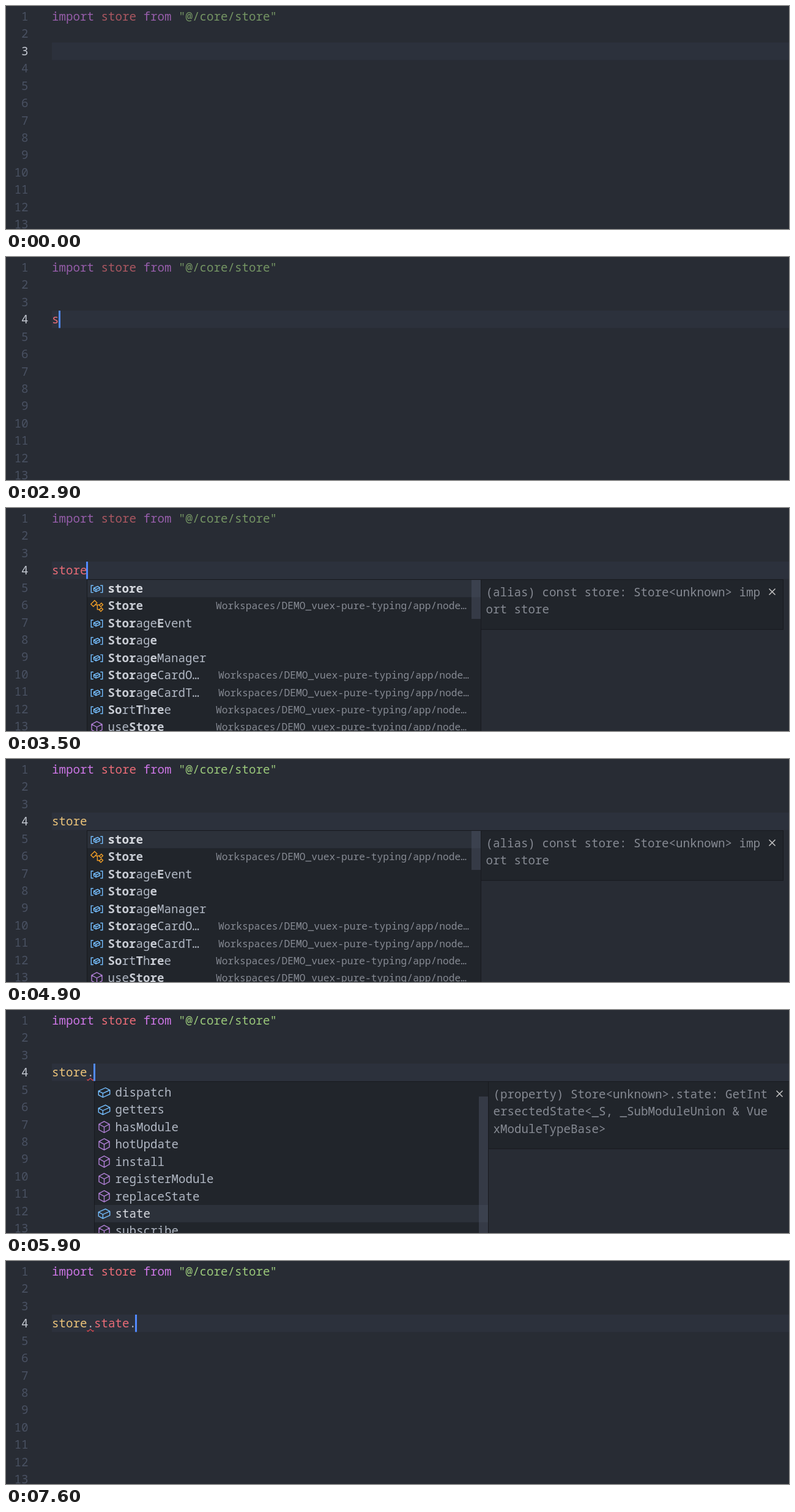
These frames come from a looping animation (1280 by 366 pixels, 8000 ms). An HTML page with a canvas:

```html
<!DOCTYPE html>
<html lang="en">
<head>
<meta charset="utf-8">
<title>Editor autocomplete</title>
<style>
  html, body { margin: 0; width: 100%; height: 100%; overflow: hidden; background: #282c34; }
  canvas { display: block; }
</style>
</head>
<body>
<canvas id="stage" width="1280" height="366"></canvas>
<script>
const ctx = document.getElementById('stage').getContext('2d');
const LOOP = 8000;
const CHAR = 11.5, CARET_STEP = 11.36, LINE = 28.42, LEFT = 75;
const FONT = '"Noto Sans Mono", "DejaVu Sans Mono", monospace';
const SIZE = CHAR / 0.6;

const color = {
  bg: '#282c34', line: '#2c313c', gutter: '#495162', active: '#c0c5ce',
  purple: '#cd76e6', red: '#ea6c77', green: '#9bc97b', yellow: '#ecc47a',
  text: '#b1b8c4', bright: '#d7dae0', match: '#c8ccd4', faint: '#868a93',
  panel: '#21252b', border: '#181a1f', selected: '#2c313a', thumb: 'rgba(78, 86, 102, 0.45)',
  caret: '#528bff', error: '#d9484f'
};

// Icons live on a 16-unit grid.
const icons = {
  variable: ['#75beff', 'M4 4.5H1.5v8H4M12 4.5h2.5v8H12M4.5 7.5L9 5.5l2.5 1.5v2.5l-4.5 2L4.5 10zl2.5 1.5 4.5-2M7 9v2.5'],
  field: ['#75beff', 'M1.5 6.3l8-3.6 5 2.7v4.7l-8 3.6-5-2.7zl5 2.7 8-3.6M6.5 9v4.7'],
  method: ['#b180d7', 'M8 1.5l6 3.2v6.5l-6 3.3-6-3.3V4.7zM2 4.7L8 8l6-3.3M8 8v6.5'],
  keyword: ['#c5c5c5', 'M10 3.5h5M1 6.5h9M12 6.5h2M1 9.5h6M10 9.5h5M1 12.5h11M1.5 2.5h6v2h-6z'],
  class: ['#ee9d28', 'M1.2 6l4.2-4.2 2.8 2.8L4 8.8zM6.5 6.8H11M8.6 6.8v5.4H11M10.8 7.2l2.4-2.4 1.8 1.8-2.4 2.4zM10.8 12.6l2.4-2.4 1.8 1.8-2.4 2.4z']
};
for (const name in icons) icons[name][1] = new Path2D(icons[name][1]);

const srcPath = 'Workspaces/DEMO_vuex-pure-typing/app/src/…';
const nodePath = 'Workspaces/DEMO_vuex-pure-typing/app/node…';
const aliasDoc = ['(alias) const store: Store<unknown> imp', 'ort store'];

// Asterisks in labels toggle the bold matched letters.
const shortList = {
  top: 118, selected: 0, thumb: [118, 29], doc: aliasDoc,
  rows: [
    ['variable', '*st*ore'], ['variable', '*st*atus'], ['variable', '*st*atusbar'],
    ['method', '*st*op'], ['keyword', '*st*ring'], ['variable', '*st*yleMedia'],
    ['variable', '*st*ickElement', srcPath], ['variable', '*st*ickElement', srcPath],
    ['variable', '*St*aticRange']
  ]
};
const storeList = {
  top: 118, selected: 0, thumb: [118, 64], doc: aliasDoc,
  rows: [
    ['variable', '*store*'], ['class', '*Store*', nodePath],
    ['variable', '*Stor*age*E*vent'], ['variable', '*Stor*ag*e*'],
    ['variable', '*Stor*ag*e*Manager'],
    ['variable', '*Stor*ag*e*CardO…', nodePath, 4], ['variable', '*Stor*ag*e*CardT…', nodePath, 4],
    ['variable', '*So*rt*T*h*re*e', nodePath], ['method', 'use*Store*', nodePath]
  ]
};
const memberList = {
  top: 121, selected: 7, thumb: [142, 224],
  doc: ['(property) Store<unknown>.state: GetInt', 'ersectedState<_S, _SubModuleUnion & Vue', 'xModuleTypeBase>'],
  rows: [
    ['field', 'dispatch'], ['field', 'getters'], ['method', 'hasModule'],
    ['method', 'hotUpdate'], ['method', 'install'], ['method', 'registerModule'],
    ['method', 'replaceState'], ['field', 'state'], ['method', 'subscribe']
  ]
};

const typed = [[2900, 's'], [3100, 'st'], [3400, 'stor'], [3500, 'store'],
  [5000, 'store.'], [7400, 'store.state'], [7600, 'store.state.']];
const popups = [[3200, shortList], [3400, storeList], [5000, null], [5200, memberList], [7400, null]];
const carets = [[600, true], [1100, false], [1600, true], [2000, false], [2400, true],
  [4000, false], [4400, true], [4900, false], [5000, true], [5400, false],
  [5900, true], [6300, false], [6800, true], [7200, false], [7400, true]];

const at = (track, t, initial) => track.reduce((value, [time, next]) => t >= time ? next : value, initial);
const between = (t, from, to) => t >= from && t < to;

function rect(x, y, w, h, fill) {
  ctx.fillStyle = fill;
  ctx.fillRect(x, y, w, h);
}

// Sets each character on the monospace grid and returns the next column's x.
function text(str, x, y, fill, size = SIZE, weight = 400) {
  ctx.font = `${weight} ${size}px ${FONT}`;
  ctx.fillStyle = fill;
  for (const ch of str) {
    ctx.fillText(ch, x, y);
    x += size * 0.6;
  }
  return x;
}

function icon(name, cx, cy) {
  const [stroke, path] = icons[name];
  ctx.save();
  ctx.translate(cx, cy);
  ctx.scale(1.42, 1.42);
  ctx.translate(-8, -8);
  ctx.strokeStyle = stroke;
  ctx.lineWidth = 1;
  ctx.stroke(path);
  ctx.restore();
}

function strokePath(d, stroke, width) {
  ctx.strokeStyle = stroke;
  ctx.lineWidth = width;
  ctx.stroke(new Path2D(d));
}

function drawEditor(t) {
  const current = t < 600 ? 3 : 4;
  rect(0, 0, 1280, 366, color.bg);
  rect(LEFT, Math.round(3 + LINE * (current - 1)), 1280 - LEFT, 28.5, color.line);
  for (let n = 1; n <= 13; n++) {
    const label = String(n);
    text(label, 36.5 - label.length * CHAR, 24 + LINE * (n - 1), n === current ? color.active : color.gutter);
  }
  ctx.globalAlpha = t < 4100 ? 0.667 : 1;
  let x = text('import ', LEFT, 24, color.purple);
  x = text('store ', x, 24, color.red);
  x = text('from ', x, 24, color.purple);
  text('"@/core/store"', x, 24, color.green);
  ctx.globalAlpha = 1;
}

function drawTyping(t, code) {
  const y = 24 + LINE * 3;
  const known = t >= 3800 && !between(t, 5000, 5300);
  let x = text(code.slice(0, 5), LEFT, y, known ? color.yellow : color.red);
  x = text(code.slice(5, 6), x, y, color.text);
  x = text(code.slice(6, 11), x, y, color.red);
  text(code.slice(11), x, y, color.text);
  if (t >= 5300) strokePath('M132.5 114l1.5 1.5 4-3.5 4 3.5 1.5-1.5', color.error, 1.3);
  if (at(carets, t, false)) rect(Math.floor(LEFT + code.length * CARET_STEP), 88, 3, 28.5, color.caret);
}

function drawDoc(lines, x) {
  const height = lines.length * LINE + 25;
  rect(x, 117, 495, height + 1, color.border);
  rect(x + 1, 118, 493, height - 1, color.panel);
  lines.forEach((line, i) => text(line, x + 8.5, 145 + i * LINE, color.faint));
  const cx = x + 476.5;
  strokePath(`M${cx - 5} 132.5l10 10m0-10l-10 10`, '#c5c5c5', 1.5);
}

function drawPopup(list, left, showDoc) {
  if (showDoc) drawDoc(list.doc, left + 644);
  rect(left, 117, 645, 249, color.border);
  rect(left + 1, 118, 643, 248, color.panel);
  list.rows.forEach(([kind, label, detail, shift = 0], i) => {
    const top = list.top + i * LINE;
    const chosen = i === list.selected;
    if (chosen) rect(left + 1, Math.round(top), 643, 28.4, color.selected);
    icon(kind, left + 16.5, top + 14.2);
    let x = left + 34.5;
    label.split('*').forEach((part, j) => {
      const matched = j % 2 === 1;
      const fill = chosen ? color.bright : matched ? color.match : color.text;
      x = text(part, x, top + 21, fill, SIZE, matched ? 600 : 400);
    });
    if (detail) text(detail, left + 211 + shift, top + 20, color.faint, 16.27);
  });
  rect(left + 629, list.thumb[0], 15, list.thumb[1], color.thumb);
}

function draw() {
  const t = performance.now() % LOOP;
  const code = at(typed, t, '');
  const popup = at(popups, t, null);
  drawEditor(t);
  drawTyping(t, code);
  if (popup) {
    const loading = between(t, 3200, 3300) || between(t, 5200, 5300);
    drawPopup(popup, Math.floor(LEFT + code.length * CHAR), !loading);
  }
  requestAnimationFrame(draw);
}
draw();
</script>
</body>
</html>
```
